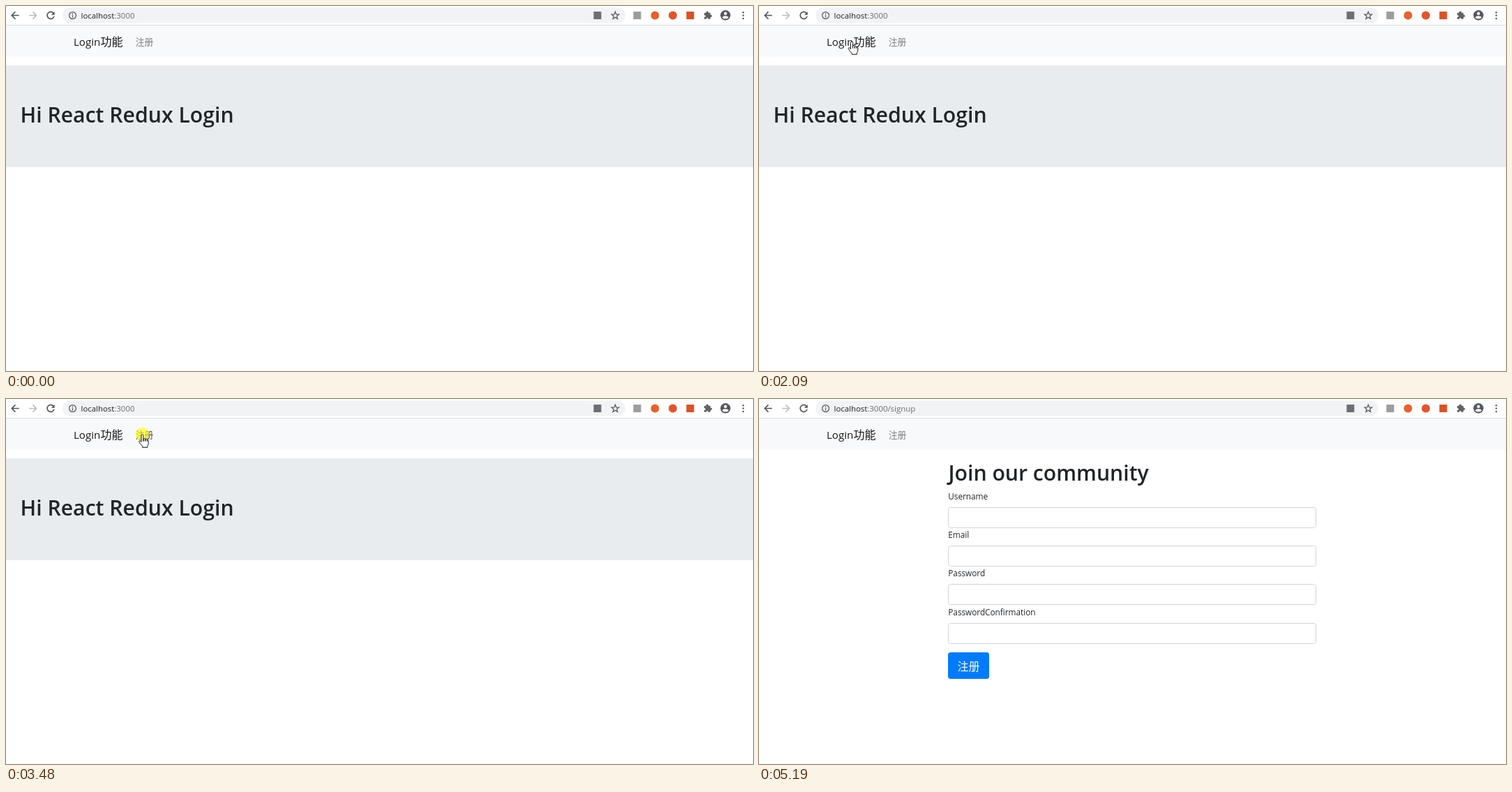
Write an HTML page that moves like this. It is 1071 px wide and 523 px high and loops after 5260 ms.

```html
<!DOCTYPE html>
<html lang="zh">
<head>
<meta charset="utf-8">
<title>Login</title>
<style>
  html, body { margin: 0; width: 100%; height: 100%; overflow: hidden; background: #fff; }
  svg { display: block; width: 1071px; height: 523px; }
  text { font: 11.75px "Open Sans", "Noto Sans CJK SC", "Noto Sans CJK", sans-serif; fill: #212529; white-space: pre; }
  .cjk { font-family: "Noto Sans CJK SC", "Noto Sans CJK", sans-serif; font-size: 16px; }
  .title { font-size: 30.2px; font-weight: 600; }
  .url { font-size: 11.4px; fill: #202124; }
  .dim { fill: #6b6f74; }
  .brand { font-size: 15.1px; fill: #19191a; }
  .line { fill: none; stroke: #505357; stroke-width: 1.6; }
  .thin { stroke-width: 1.2; }
  #link { font-size: 12.8px; }
</style>
</head>
<body>
<svg viewBox="0 0 1071 523">
  <!-- browser bar -->
  <rect x="81" y="2.5" width="807" height="22" rx="11" fill="#f1f3f4"/>
  <rect y="27" width="1071" height="1" fill="#d9dbde"/>
  <path class="line" d="M18.7 13.5H8.6M13.4 8.4L8.3 13.5l5.1 5.1"/>
  <path class="line" style="stroke:#bbbdc0" d="M33 13.5h10.2M38.4 8.4l5.1 5.1-5.1 5.1"/>
  <path class="line" d="M68.3 10.6A5 5 0 1 0 69 14.6"/>
  <path d="M69.7 8v4.8h-4.8z" fill="#505357"/>
  <circle class="line thin" cx="95.5" cy="13.5" r="4.9"/>
  <path class="line thin" d="M95.5 10.6v1.3M95.5 12.8v3.6"/>
  <text class="url" x="107.6" y="17.5">localhost<tspan class="dim">:3000<tspan id="path"></tspan></tspan></text>
  <path id="star" class="line thin"/>
  <g id="marks"></g>
  <g id="menu" fill="#5f6368"></g>
  <g fill="#5f6368">
    <rect x="1001" y="9.8" width="9" height="9" rx="1"/>
    <circle cx="1005.5" cy="9.4" r="1.8"/>
    <circle cx="1010.4" cy="14.2" r="1.8"/>
    <circle cx="1031.5" cy="13.3" r="7.2" fill="#53575c"/>
  </g>
  <g fill="#fff">
    <circle cx="1001.4" cy="14.4" r="1.5"/>
    <circle cx="1005.5" cy="18.6" r="1.5"/>
    <circle cx="1031.5" cy="10.7" r="2.2"/>
    <ellipse cx="1031.5" cy="16.2" rx="4.2" ry="2"/>
  </g>

  <!-- navbar -->
  <rect y="28" width="1071" height="44.4" fill="#f8f9fa"/>
  <text class="brand" x="97" y="57">Login<tspan class="cjk" x="135.6">功能</tspan></text>
  <text id="link" class="cjk" x="185.8" y="55.8">注册</text>

  <g id="home">
    <rect y="85" width="1071" height="146" fill="#e9ecef"/>
    <text class="title" x="20.5" y="167">Hi React Redux Login</text>
  </g>

  <g id="signup">
    <text class="title" x="271.5" y="117">Join our community</text>
    <g id="fields"></g>
    <rect x="271" y="363" width="59" height="38" rx="3.8" fill="#007bff"/>
    <text class="cjk" x="284.6" y="388.7" style="fill:#fff">注册</text>
  </g>

  <g id="pointer">
    <circle id="glow" r="9.8" fill="#ff0" opacity=".6"/>
    <path id="arrow" d="M0 0V16L3.7 12.5 6.2 18.5 8.6 17.5 6.1 11.6H11.3z" fill="#fff" stroke="#000" stroke-width=".9"/>
    <path id="hand" fill="#fff" stroke="#111" stroke-linejoin="round"
      d="M-1.5 11V2a1.5 1.5 0 0 1 3 0v8V7.4a1.4 1.4 0 0 1 2.8 0V10 8a1.3 1.3 0 0 1 2.6 0v2-1a.9 .9 0 0 1 1.8 0v4q0 2-1.5 4v1.8h-7v-1.6q-3-3.2-4.8-6-.7-1.4.4-2 1.3-.4 2.7 1.8z"/>
  </g>
</svg>
<script>
const LOOP = 5260, TICK = 77.6, ENTER = 220, LEAVE = 4880, BLUR = 5190;
const TRAVEL = 400, ROW = 50.5;

// pointer stops: time, hold, x, y; every hold is a click, on link and brand in turn
const STOPS = [
  [ENTER, 0, 897, 495],
  [680, 0, 145, 36],
  [1220, 160, 206],
  [2010, 80, 133],
  [2480, 80, 216],
  [3010, 80, 145],
  [3480, 80, 195.5],
  [3950, 80, 143],
  [4330, 150, 207],
  [LEAVE, 0, 880, 492]
].map(([press, hold, x, y = ROW]) => ({ press, release: press + hold, x, y }));
const CLICKS = STOPS.filter(s => s.release > s.press);

const $ = id => document.getElementById(id);
const show = (id, on) => $(id).style.display = on ? '' : 'none';
const range = (n, fn) => Array.from({ length: n }, (_, i) => fn(i));
const easeOut = f => 1 - (1 - f) ** 3;

const star = range(10, i => {
  const r = i % 2 ? 2.4 : 5.6, a = i * Math.PI / 5;
  return [873.5 + r * Math.sin(a), 13.8 - r * Math.cos(a)];
});
$('star').setAttribute('d', `M${star.join('L')}z`);

const square = (x, fill) => `<rect x="${x - 5.5}" y="8" width="11" height="11" fill="${fill}"/>`;
const disc = (x, fill, y = 13.5, r = 6) => `<circle cx="${x}" cy="${y}" r="${r}" fill="${fill}"/>`;
$('marks').innerHTML = square(848, '#6c7074') + square(905, '#9b9d9e') +
  disc(930.5, '#e8622c') + disc(956, '#e2542b') + square(981, '#dc5126');
$('menu').innerHTML = range(3, i => disc(1057, '#5f6368', 9.3 + i * 4.3, 1.25)).join('');

$('fields').innerHTML = ['Username', 'Email', 'Password', 'PasswordConfirmation'].map((label, i) => {
  const y = Math.floor(155.1 + i * 55.3);
  return `<text x="271.3" y="${y - 11}">${label}</text>
    <rect x="271.5" y="${y + .5}" width="527" height="29" rx="3.2" fill="#fff" stroke="#ced4da"/>`;
}).join('');

function pointerAt(time) {
  const t = ENTER + Math.floor((time - ENTER + 7) / TICK) * TICK;
  const i = Math.max(1, STOPS.findIndex(s => s.press > t));
  const a = STOPS[i - 1], b = STOPS[i];
  const start = Math.max(a.release, b.press - TRAVEL);
  const f = easeOut(Math.min(1, Math.max(0, (t - start) / (b.press - start))));
  return [a.x + (b.x - a.x) * f, a.y + (b.y - a.y) * f];
}

function draw(t) {
  const [x, y] = pointerAt(t);
  const here = t >= ENTER && t < LEAVE;
  const inRow = here && y > 38 && y < 65;
  const onLink = inRow && x > 179 && x < 219;
  const onBrand = inRow && x > 96 && x < 168;
  const pressed = CLICKS.filter(c => t >= c.press).length;
  const released = CLICKS.filter(c => t >= c.release).length;
  const signup = released % 2 === 1;
  const focused = pressed % 2 === 1 && t < BLUR;

  show('home', !signup);
  show('signup', signup);
  $('path').textContent = signup ? '/signup' : '';
  $('link').style.fill = onLink || focused ? '#4a4b4b' : '#7c7d7d';

  show('pointer', here);
  $('pointer').setAttribute('transform', `translate(${x} ${y})`);
  show('glow', pressed > released);
  show('hand', onLink || onBrand);
  show('arrow', !onLink && !onBrand);
}

const t0 = performance.now();
function frame() {
  draw((performance.now() - t0) % LOOP);
  requestAnimationFrame(frame);
}
draw(0);
requestAnimationFrame(frame);
</script>
</body>
</html>
```
